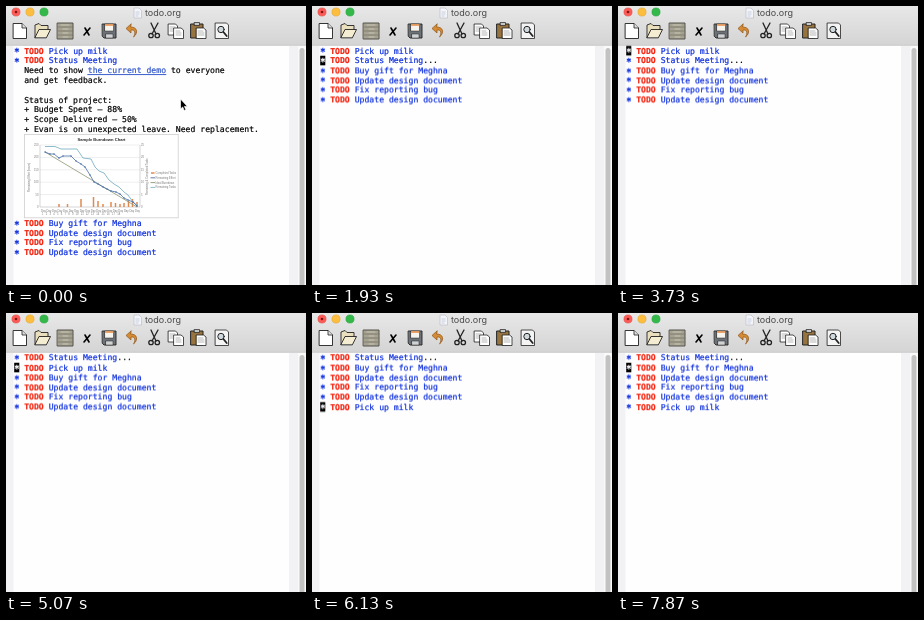
Animation of 300 by 279 pixels, one loop 8 s. Source, as an HTML page:

```html
<!DOCTYPE html>
<html lang="en">
<head>
<meta charset="utf-8">
<title>todo.org</title>
<style>
:root { --row: 9.83px; }
html, body { margin: 0; width: 100%; height: 100%; overflow: hidden; background: #fff; }
svg { display: block; width: 100%; height: 100%; }
.mono { font: 8.14px "DejaVu Sans Mono", monospace; text-rendering: geometricPrecision; }
.ink { color: #000; fill: currentColor; stroke: currentColor; stroke-width: .2; }
.head { color: #0a2cdc; }
.todo { color: #f52410; font-weight: bold; }
.link { color: #2f55c8; text-decoration: underline; }
.black { color: #000; }
.white { color: #fff; }
.star { font-size: 9.5px; stroke-width: .35; }
.title { font: 9px Inter, "Liberation Sans", sans-serif; fill: #4a4a4a; }
.tiny { font: 2.7px "Liberation Sans", sans-serif; fill: #777; }
.icon { stroke: #222; stroke-width: 1; stroke-linejoin: round; stroke-linecap: round; }

.anim { animation: 8s step-end infinite; }
.mouse { animation-name: mouse; }
.body { animation-name: unfolded; }
.dots { animation-name: folded; }
.rest { animation-name: fold; }
.milk { animation-name: sink; }
.up1 { animation-name: up1; }
.up2 { animation-name: up2; }
.up3 { animation-name: up3; }
.up4 { animation-name: up4; }
.up5 { animation-name: up5; }
.caret { animation-name: blink, move; }

@keyframes mouse { 0% { opacity: 1 } 14.1%, to { opacity: 0 } }
@keyframes unfolded { 0% { opacity: 1 } 24.1%, to { opacity: 0 } }
@keyframes folded { 0% { opacity: 0 } 24.1%, to { opacity: 1 } }
@keyframes fold { 0% { transform: translateY(152.6px) } 24.1%, to { transform: none } }
@keyframes sink {
  0% { transform: translateY(0) }
  63.3% { transform: translateY(var(--row)) }
  67.4% { transform: translateY(calc(var(--row) * 2)) }
  69.9% { transform: translateY(calc(var(--row) * 3)) }
  74.1% { transform: translateY(calc(var(--row) * 4)) }
  76.6%, to { transform: translateY(calc(var(--row) * 5)) }
}
@keyframes up1 { 0% { transform: none } 63.3%, to { transform: translateY(calc(var(--row) * -1)) } }
@keyframes up2 { 0% { transform: none } 67.4%, to { transform: translateY(calc(var(--row) * -1)) } }
@keyframes up3 { 0% { transform: none } 69.9%, to { transform: translateY(calc(var(--row) * -1)) } }
@keyframes up4 { 0% { transform: none } 74.1%, to { transform: translateY(calc(var(--row) * -1)) } }
@keyframes up5 { 0% { transform: none } 76.6%, to { transform: translateY(calc(var(--row) * -1)) } }
@keyframes blink {
  0%, 9.9%, 19.9%, 30%, 42.4%, 53.3%, 83.3% { opacity: 0 }
  4.1%, 14.1%, 24.1%, 36.6%, 46.6%, 59.1%, 85.8%, to { opacity: 1 }
}
@keyframes move {
  0%, 96.6%, to { transform: translateY(var(--row)) }
  46.6% { transform: translateY(0) }
  63.3% { transform: translateY(var(--row)) }
  67.4%, 91.6% { transform: translateY(calc(var(--row) * 2)) }
  69.9%, 88.3% { transform: translateY(calc(var(--row) * 3)) }
  74.1%, 85.8% { transform: translateY(calc(var(--row) * 4)) }
  76.6% { transform: translateY(calc(var(--row) * 5)) }
}
</style>
</head>
<body>
<svg viewBox="0 0 300 279" preserveAspectRatio="none">
  <defs>
    <linearGradient id="bar" x2="0" y2="1">
      <stop stop-color="#e9e8e9"/><stop offset="1" stop-color="#d5d4d5"/>
    </linearGradient>
    <marker id="dot" markerWidth="2" markerHeight="2" refX="1" refY="1" markerUnits="userSpaceOnUse">
      <circle cx="1" cy="1" r=".75" fill="#4a6fa8"/>
    </marker>
    <g id="mark">
      <text x="8" y="49.400" class="ink head star">*</text>
      <text x="18.200" y="47.500" class="ink todo">TODO</text>
    </g>
  </defs>

  <!-- editor area -->
  <rect width="300" height="279" fill="#fefeff"/>
  <path d="M0 40h7.500v239H0zM283 40h9.500v239H283z" fill="#f2f1f4"/>
  <rect x="292.500" y="40" width="7.500" height="239" fill="#fafafa"/>
  <rect x="293.500" y="42" width="5" height="242" rx="2.500" fill="#c2c2c2"/>

  <!-- title bar and tool bar -->
  <rect width="300" height="39.500" fill="url(#bar)"/>
  <path d="M0 39.300h300" stroke="#bcbcbc" stroke-width=".6"/>
  <g stroke-width=".5">
    <circle cx="10" cy="6" r="4.100" fill="#fc5b57" stroke="#e0443e"/>
    <circle cx="10" cy="6" r="1.300" fill="#7d1511"/>
    <circle cx="24" cy="6" r="4.100" fill="#fdbd3f" stroke="#dea123"/>
    <circle cx="38" cy="6" r="4.100" fill="#34b84a" stroke="#1aa034"/>
  </g>
  <path d="M128 2h5l2.500 2.500v7.500H128z" fill="#f4f5f8" stroke="#b3b8c4" stroke-width=".6"/>
  <path d="M129.500 6h4M129.500 8h4M129.500 10h3" stroke="#b4bdd6" stroke-width=".7"/>
  <text x="139" y="9.700" class="title">todo.org</text>

  <g class="icon">
    <path d="M7.500 17.500h8.500l4.500 4.500v10.500h-13z" fill="#fff" stroke-width=".9"/>
    <path d="M16 17.500v4.500h4.500" fill="#ddd" stroke-width=".8"/>
    <path d="M29 31.500V19l4-1.500 2 2h7v4" fill="#e9dfbd" stroke-width=".9"/>
    <path d="M29 31.500l4-8h11.500l-4 8z" fill="#f5edd2" stroke-width=".9"/>
    <path d="M51.500 17h15.500v16h-15.500z" fill="#a5a292" stroke="#55534a"/>
    <path d="M52 21h15M52 25h15M52 29h15" stroke="#7a7768" stroke-width=".8"/>
    <path d="M55 19h8M57 23h5M57 27h5M57 31h5" stroke="#cfccba" stroke-width=".8"/>
    <path d="M78 29l6-7M79 22l4 7" fill="none" stroke="#000" stroke-width="1.600"/>
    <path d="M96.500 18h13.500v14h-12l-1.500-1.500z" fill="#6d7278" stroke-width=".9"/>
    <path d="M99 18h8.500v7h-8.500z" fill="#f7f4ee" stroke-width=".5"/>
    <path d="M99.500 19h7.500" stroke="#e88b43" stroke-width="1.400"/>
    <path d="M100 28h7v4h-7z" fill="#d0d2d4" stroke-width=".5"/>
    <path d="M125 18l-5 4.500 5 4.500v-3c4-.5 5 3 2.500 7 5-4 4-10-2.500-10z" fill="#d58a34" stroke="#8d561a" stroke-width=".7"/>
    <path d="M145 17l5 11M152 17l-6 11" fill="none" stroke-width="1.300"/>
    <circle cx="145" cy="29.500" r="2.200" fill="none" stroke-width="1.300"/>
    <circle cx="151.300" cy="29.500" r="2.200" fill="none" stroke-width="1.300"/>
    <g fill="#fff" stroke-width=".8">
      <path d="M162.500 18h7l2 2v9h-9z"/>
      <path d="M168 22h7l2.500 2v8.500H168z"/>
    </g>
    <path d="M164 21h5M164 23h3M164 25h3M170 25h4M170 27h5M170 29h5" stroke="#888" stroke-width=".6"/>
    <path d="M185 18h12v14h-12z" fill="#96733f"/>
    <path d="M188.500 16.500h5v3h-5z" fill="#c6c6c6" stroke-width=".7"/>
    <path d="M190.500 22h7l2.500 2v8.500h-9.500z" fill="#fff" stroke-width=".8"/>
    <path d="M192 25h5M192 27h6M192 29h6" stroke="#888" stroke-width=".6"/>
    <path d="M209.500 17h11l2 2v13.500h-13z" fill="#f4f4f4" stroke-width=".8"/>
    <circle cx="215" cy="23.500" r="3.200" fill="#cfd8dc"/>
    <path d="M217.400 26l3.300 4" stroke-width="1.800"/>
  </g>

  <!-- expanded entry -->
  <g class="anim body">
    <g class="mono ink">
      <text x="18.200" y="67.160">Need to show <tspan class="ink link">the current demo</tspan> to everyone</text>
      <text x="18.200" y="77">and get feedback.</text>
      <text x="18.200" y="96.650">Status of project:</text>
      <text x="18.200" y="106.480">+ Budget Spent – 88%</text>
      <text x="18.200" y="116.300">+ Scope Delivered – 50%</text>
      <text x="18.200" y="126.140">+ Evan is on unexpected leave. Need replacement.</text>
    </g>

    <rect x="18.400" y="128.400" width="153.800" height="83.400" fill="#fff" stroke="#cfcfcf" stroke-width=".8"/>
    <text x="95.500" y="134.800" text-anchor="middle" style="font:bold 4.100px 'Liberation Sans',sans-serif" fill="#222">Sample Burndown Chart</text>
    <path d="M34 139h100M34 151.400h100M34 163.800h100M34 176.200h100M34 188.600h100" stroke="#dcdcdc" stroke-width=".5"/>
    <path d="M34 139v62h100v-62" fill="none" stroke="#aaa" stroke-width=".5"/>
    <g class="tiny">
      <g text-anchor="end">
        <text x="32.500" y="140">250</text><text x="32.500" y="152.400">200</text>
        <text x="32.500" y="164.800">150</text><text x="32.500" y="177.200">100</text>
        <text x="32.500" y="189.600">50</text><text x="32.500" y="202">0</text>
      </g>
      <text x="135" y="140">25</text><text x="135" y="152.400">20</text>
      <text x="135" y="164.800">15</text><text x="135" y="177.200">10</text>
      <text x="135" y="189.600">5</text><text x="135" y="202">0</text>
      <text transform="translate(24 186) rotate(-90)">Remaining Effort (hours)</text>
      <text transform="translate(141.500 189) rotate(-90)">Remaining &amp; Completed Tasks</text>
      <text x="35" y="205.500">Day Day Day Day Day Day Day Day Day Day Day Day Day Day Day Day Day Day</text>
      <text x="36" y="208.700">1 &#160; 2 &#160; 3 &#160; 4 &#160; 5 &#160; 6 &#160; 7 &#160; 8 &#160; 9 &#160; 10 &#160; 11 &#160; 12 &#160; 13 &#160; 14 &#160; 15 &#160; 16 &#160; 17 &#160; 18</text>
      <text x="149.500" y="168">Completed Tasks</text>
      <text x="149.500" y="172.800">Remaining Effort</text>
      <text x="149.500" y="177.600">Ideal Burndown</text>
      <text x="149.500" y="182.400">Remaining Tasks</text>
    </g>
    <path d="M53 201v-3M61.500 201v-3M75 201v-8M87.500 201v-10M92 201v-6M97 201v-3M105 201v-5M109.500 201v-4M114 201v-3M118 201v-4M122.500 201v-6M126.500 201v-8M131 201v-5" stroke="#e08a50" stroke-width="1.500"/>
    <g fill="none">
      <path d="M39 146L131 201" stroke="#8c9673" stroke-width=".8"/>
      <path d="M39 140.500H49L55 143H71L77 152L85 153L89 161L93 165L98 167L103 174L108 178L113 181L118 186L122 189L127 196L131 199" stroke="#7fb4c4" stroke-width=".9"/>
      <path d="M39 146L44 148H48L53 152L57 150H65L70 155L75 158L79 161L84 169L88 176L92 178L97 181L101 183L105 185L110 186L114 188L118 192L122 194L127 196L131 200" stroke="#4a6fa8" stroke-width=".8" marker-start="url(#dot)" marker-mid="url(#dot)" marker-end="url(#dot)"/>
      <g stroke-width=".9">
        <path d="M145 167h3.500" stroke="#e08a50" stroke-width="1.500"/>
        <path d="M144.500 171.800h4.500" stroke="#4a6fa8"/>
        <path d="M144.500 176.600h4.500" stroke="#8c9673"/>
        <path d="M144.500 181.400h4.500" stroke="#7fb4c4"/>
      </g>
    </g>
  </g>

  <!-- headings -->
  <g class="mono ink head">
    <g class="anim milk"><use href="#mark"/><text x="42.700" y="47.500">Pick up milk</text></g>
    <g class="anim up1">
      <g transform="translate(0 9.830)">
        <use href="#mark"/><text x="42.700" y="47.500">Status Meeting</text>
        <text x="111.300" y="47.500" class="ink black anim dots">...</text>
      </g>
    </g>
    <g class="anim rest">
      <g class="anim up2"><g transform="translate(0 19.660)"><use href="#mark"/><text x="42.700" y="47.500">Buy gift for Meghna</text></g></g>
      <g class="anim up3"><g transform="translate(0 29.490)"><use href="#mark"/><text x="42.700" y="47.500">Update design document</text></g></g>
      <g class="anim up4"><g transform="translate(0 39.320)"><use href="#mark"/><text x="42.700" y="47.500">Fix reporting bug</text></g></g>
      <g class="anim up5"><g transform="translate(0 49.150)"><use href="#mark"/><text x="42.700" y="47.500">Update design document</text></g></g>
    </g>
  </g>

  <g class="mono anim caret">
    <rect x="8.200" y="39.900" width="5.100" height="9.600"/>
    <text x="8" y="49.400" class="ink white star">*</text>
  </g>

  <path class="anim mouse" d="M174.500 93v10l2.200-2 1.500 3.500 1.700-.8-1.500-3.300h3z" stroke="#fff" stroke-width=".7"/>
</svg>
</body>
</html>
```
